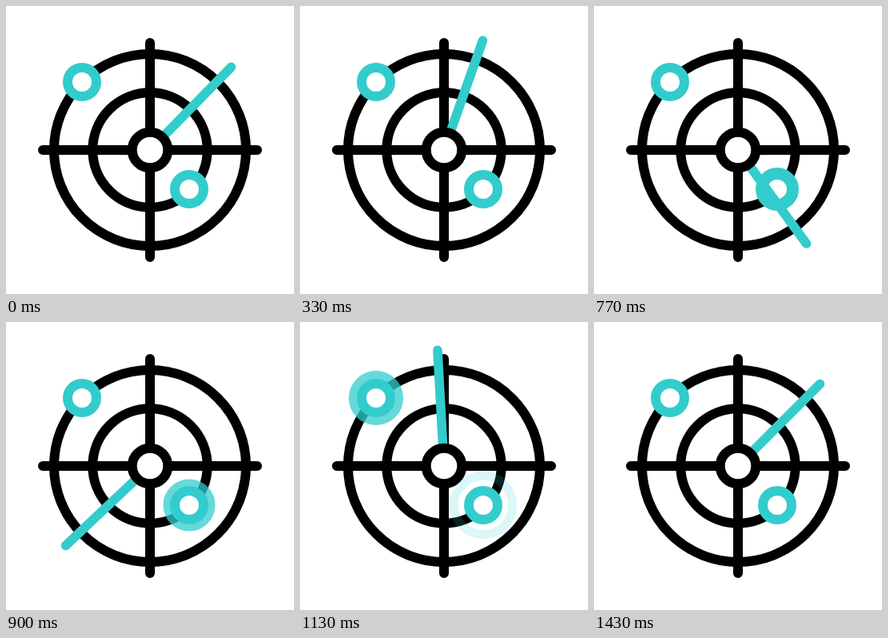
Write an HTML page that moves like this. It is 360x360 px and loops after 1670 ms.

```html
<!DOCTYPE html>
<html lang="en">
<head>
<meta charset="utf-8">
<title>Radar</title>
<style>
  html, body { margin: 0; width: 100%; height: 100%; overflow: hidden; background: #fff; }
  svg { display: block; width: 100vw; height: 100vh; }
  g { fill: none; stroke-width: 12; stroke-linecap: round; }
  .ink { stroke: #000; }
  .teal { stroke: #3cc; }
  .ping { stroke-width: 11; }
  .solid { fill: #fff; }
</style>
</head>
<body>
<svg viewBox="0 0 360 360">
  <g class="ink">
    <circle cx="180" cy="180" r="120"/>
    <circle cx="180" cy="180" r="71.7"/>
    <path d="M46 180H314M180 46V314"/>
  </g>
  <g class="teal">
    <circle id="pingA" class="ping" cx="229" cy="229" r="18"/>
    <circle id="pingB" class="ping" cx="95" cy="95" r="18"/>
    <circle class="solid" cx="229" cy="229" r="18"/>
    <circle class="solid" cx="95" cy="95" r="18"/>
    <path id="arm" d="M180 158V35" stroke-width="11.6"/>
  </g>
  <g class="ink">
    <circle class="solid" cx="180" cy="180" r="22.3"/>
  </g>
</svg>
<script>
  const LOOP = 1670, STEP = 100 / 3;
  const byId = id => document.getElementById(id);
  const arm = byId('arm');
  const pings = [
    { el: byId('pingA'), start: 20.5, fade: 24, end: 36, grow: 21.5 },
    { el: byId('pingB'), start: 28, fade: 31, end: 43, grow: 26.5 }
  ];

  const part = (x, a, b) => Math.min(1, Math.max(0, (x - a) / (b - a)));
  const ease = u => u * u * (3 - 2 * u);

  // Wind back, then sweep a full turn.
  const REST = 44.4, BACK = 16.8, FINAL = 405, TURN = 12.4, STOP = 40.1;
  const armAngle = n => n < TURN
    ? REST + (BACK - REST) * ease(part(n, 0, TURN))
    : BACK + (FINAL - BACK) * ease(part(n, TURN, STOP));

  function draw(ms) {
    // Motion advances in 30 fps steps, on a 10 ms clock.
    const n = Math.floor((ms % LOOP + 5) / STEP);
    arm.setAttribute('transform', `rotate(${armAngle(n)} 180 180)`);
    for (const p of pings) {
      p.el.setAttribute('r', 18 + p.grow * part(n, p.start, p.end));
      p.el.setAttribute('opacity', n < p.start ? 0 : 1 - part(n, p.fade, p.end));
    }
  }

  function tick() {
    draw(performance.now());
    requestAnimationFrame(tick);
  }
  draw(0);
  requestAnimationFrame(tick);
</script>
</body>
</html>
```
